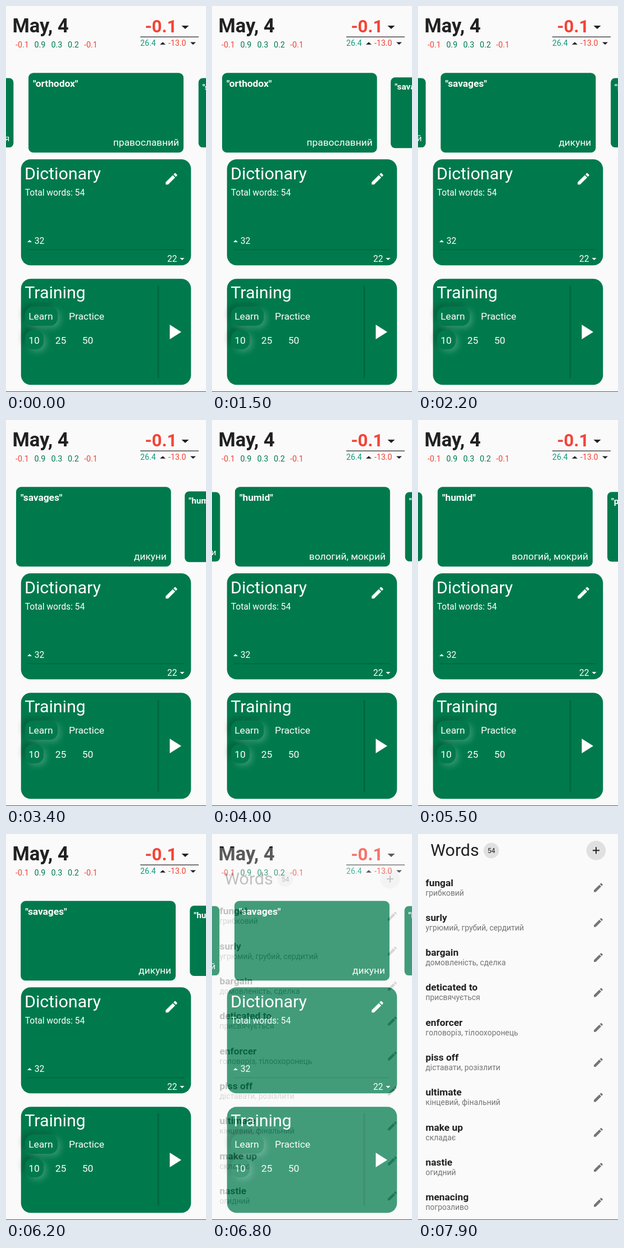
Animation of 356x688 px, one loop 8000 ms. Source, as an HTML page:

```html
<!DOCTYPE html>
<html lang="en">
<head>
<meta charset="utf-8">
<title>Vocabulary app</title>
<style>
  html, body { margin: 0; width: 100%; height: 100%; overflow: hidden; background: #fafafa; }
  svg { display: block; width: 356px; height: 688px; }
  text { font-family: Roboto, "Noto Sans", sans-serif; white-space: pre; }
</style>
</head>
<body>
<svg id="stage" viewBox="0 0 356 688" xmlns="http://www.w3.org/2000/svg">
  <defs>
    <filter id="soft" x="-60%" y="-60%" width="220%" height="220%"><feGaussianBlur stdDeviation="5.5"/></filter>
    <path id="pencil" transform="translate(-12 -12)" d="M3 17.25V21h3.75L17.81 9.94l-3.75-3.75L3 17.25zM20.71 7.04a1 1 0 0 0 0-1.41l-2.34-2.34a1 1 0 0 0-1.41 0l-1.83 1.83 3.75 3.75 1.83-1.83z"/>
  </defs>
  <rect width="356" height="688" fill="#fafafa"/>
  <g id="home"></g>
  <g id="carousel"></g>
  <g id="list"></g>
  <rect y="687" width="356" height="1" fill="#555"/>
</svg>
<script>
const LOOP = 8000, STEP = 100;
const GREEN = '#007a4d', RED = '#f44336', TEAL = '#109a80', INK = '#212121';
const PAGE = 284.8, CARD_W = 276, CARD_H = 142, CARD_Y = 190.3;
const byId = id => document.getElementById(id);

const text = (x, y, size, fill, str, extra = '') =>
  `<text x="${x}" y="${y}" font-size="${size}" fill="${fill}" ${extra}>${str}</text>`;
const BOLD = 'font-weight="700"', END = 'text-anchor="end"', MID = 'text-anchor="middle"';
const rect = (x, y, w, h, r, fill, extra = '') =>
  `<rect x="${x}" y="${y}" width="${w}" height="${h}" rx="${r}" fill="${fill}" ${extra}/>`;
// Small arrow: positive h points down, negative points up.
const arrow = (x, y, w, h, fill) => `<path d="M${x} ${y}h${w}l${-w / 2} ${h}z" fill="${fill}"/>`;
const pencil = (x, y, scale, fill) =>
  `<use href="#pencil" transform="translate(${x} ${y}) scale(${scale})" fill="${fill}"/>`;
const panel = y => rect(26.7, y, 302.6, 189, 17.3, GREEN);
const chip = (x, y, w, h) =>
  rect(x - 5, y - 4, w, h, 14, '#000', 'opacity=".24" filter="url(#soft)"') +
  rect(x + 5, y + 4, w, h, 14, '#fff', 'opacity=".22" filter="url(#soft)"') +
  rect(x, y, w, h, 14, GREEN);

function homeMarkup() {
  const scores = [[17, '-0.1'], [50.5, '0.9'], [80.5, '0.3'], [110, '0.2'], [139, '-0.1']];
  return text(11.5, 47, 34.6, INK, 'May, 4', BOLD) +
    scores.map(([x, s]) => text(x, 73.5, 14.2, s < 0 ? RED : GREEN, s)).join('') +
    text(247.5, 47, 31.2, RED, '-0.1', BOLD) + arrow(312.5, 35, 13, 6, INK) +
    rect(239, 54.5, 104, 1.2, 0, INK) +
    text(239, 71, 14.2, TEAL, '26.4') + arrow(274, 68.8, 10, -4.6, INK) +
    text(289, 71, 14.2, RED, '-13.0') + arrow(328, 64.5, 10, 4.6, INK) +

    panel(273.3) +
    text(33, 309, 30.3, '#fff', 'Dictionary') +
    text(33.7, 338, 15.6, '#fff', 'Total words: 54') +
    pencil(294.5, 308, 1.14, '#fff') +
    arrow(38, 421, 8, -4, '#fff') + text(50.7, 424, 15.6, '#fff', '32') +
    rect(39, 433, 278, 2.6, 1, '#000', 'opacity=".12"') +
    text(287, 456, 15.6, '#fff', '22') + arrow(309.5, 449, 8, 4, '#fff') +

    panel(486.3) +
    text(33.3, 521, 30.3, '#fff', 'Training') +
    rect(269.5, 498, 3, 165, 1, '#000', 'opacity=".15"') +
    chip(34, 536, 58, 34) + chip(34, 578, 33, 34) +
    text(40.2, 559, 17.32, '#fff', 'Learn') + text(112, 559, 17.32, '#fff', 'Practice') +
    ['10', '25', '50'].map((n, i) => text([40.2, 87.8, 135.8][i], 602, 17.32, '#fff', n)).join('') +
    '<path d="M291.5 568v26l20.5-13z" fill="#fff"/>';
}

const cards = [
  ['history', 'історія'], ['orthodox', 'православний'], ['savages', 'дикуни'],
  ['humid', 'вологий, мокрий'], ['prevail', 'панувати, переважати'], ['dense', 'густий']
];
const cardMarkup = ([word, meaning]) => '<g>' +
  rect(-CARD_W / 2, -CARD_H / 2, CARD_W, CARD_H, 8.7, GREEN) +
  text(-130, -46, 17.32, '#fff', `"${word}"`, BOLD) +
  text(130, 58.7, 17.32, '#fff', meaning, END) + '</g>';

const words = [
  ['fungal', 'грибковий'], ['surly', 'угрюмий, грубий, сердитий'],
  ['bargain', 'домовленість, сделка'], ['deticated to', 'присвячується'],
  ['enforcer', 'головоріз, тілоохоронець'], ['piss off', 'діставати, розізлити'],
  ['ultimate', 'кінцевий, фінальний'], ['make up', 'складає'],
  ['nastie', 'огидний'], ['menacing', 'погрозливо']
];
function listMarkup() {
  const rows = words.map(([word, meaning], i) => {
    const y = i * 62.33;
    return text(13.5, 92.5 + y, 17.32, INK, word, BOLD) +
      text(13.5, 109.5 + y, 13.86, '#757575', meaning) +
      pencil(321, 95.5 + y, .88, '#757575');
  });
  // The sheet reaches above the stage, behind the hidden status bar.
  return rect(0, -26, 356, 714, 0, '#fafafa') +
    text(22.2, 39, 30.3, INK, 'Words') +
    '<circle cx="130.5" cy="29.5" r="13.8" fill="#e0e0e0"/>' +
    text(130.5, 34, 12.2, INK, '54', MID) +
    '<circle cx="317" cy="29.3" r="17.2" fill="#e0e0e0"/>' +
    '<path d="M311 29.3h12M317 23.3v12" stroke="#212121" stroke-width="1.9"/>' + rows.join('');
}

byId('home').innerHTML = homeMarkup();
byId('carousel').innerHTML = cards.map(cardMarkup).join('');
byId('list').innerHTML = listMarkup();

const clamp = v => Math.min(1, Math.max(0, v));
function cubic(x1, y1, x2, y2) {
  const at = (a, b, t) => 3 * (1 - t) * (1 - t) * t * a + 3 * (1 - t) * t * t * b + t ** 3;
  return x => {
    if (x <= 0 || x >= 1) return clamp(x);
    let lo = 0, hi = 1;
    for (let i = 0; i < 24; i++) {
      const mid = (lo + hi) / 2;
      if (at(x1, x2, mid) < x) lo = mid; else hi = mid;
    }
    return at(y1, y2, lo);
  };
}
const easeOut = cubic(0, 0, .58, 1);
const easeIn = cubic(.42, 0, 1, 1);
const fastOutSlowIn = cubic(.4, 0, .2, 1);

// Finger drag followed by the decay of an overdamped spring.
function swipe(seconds) {
  if (seconds < -.05) return 0;
  if (seconds < .1) return .7 * ((seconds + .05) / .15) ** 2;
  return 1 - .3 * Math.exp(-9.08 * (seconds - .1));
}
const swipes = [[1500, 1], [3400, 1], [4400, 1], [5090, -1], [5900, -1]];

function render(ms) {
  const page = swipes.reduce((p, [start, dir]) => p + dir * swipe((ms - start) / 1000), 1);
  [...byId('carousel').children].forEach((card, i) => {
    const offset = i - page;
    const scale = easeOut(clamp(1 - .3 * Math.abs(offset)));
    card.setAttribute('transform', `translate(${178 + offset * PAGE} ${CARD_Y}) scale(${scale})`);
  });
  const open = clamp((ms - 6665) / 300);
  const list = byId('list');
  list.setAttribute('opacity', easeIn(open));
  list.setAttribute('transform', `translate(0 ${172 * (1 - fastOutSlowIn(open))})`);
}

const start = performance.now();
function tick() {
  const elapsed = (performance.now() - start) % LOOP;
  render(Math.floor(elapsed / STEP) * STEP);
  requestAnimationFrame(tick);
}
tick();
</script>
</body>
</html>
```
